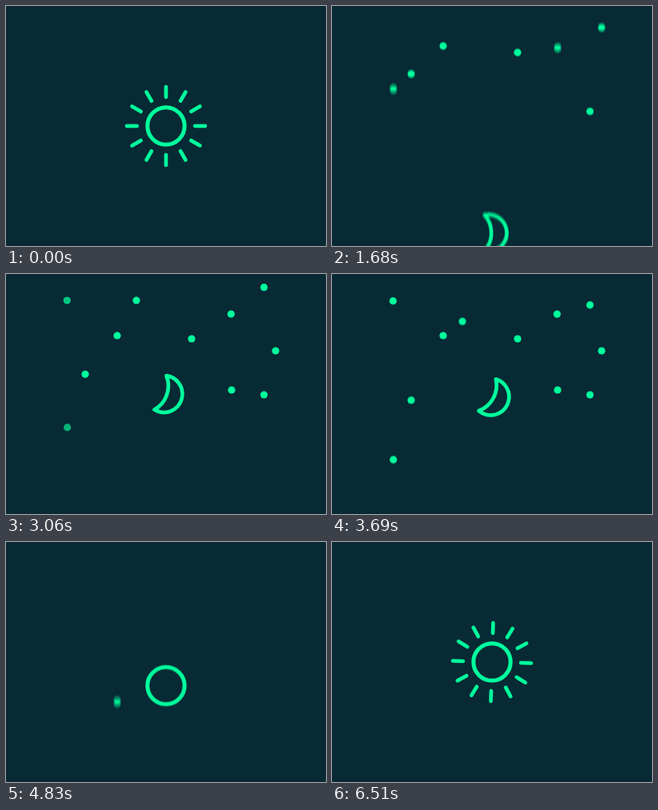
These frames come from a looping animation (400 by 300 pixels, 6.54 s). An HTML page with a canvas:

```html
<!DOCTYPE html>
<html lang="en">
<head>
<meta charset="utf-8">
<title>Day and night</title>
<style>
  html, body { margin: 0; width: 100%; height: 100%; overflow: hidden; background: #072a35; }
  canvas { display: block; width: 400px; height: 300px; }
</style>
</head>
<body>
<canvas id="stage" width="400" height="300"></canvas>
<script>
const LOOP = 6540, STEP = 30, SHUTTER = 16, SAMPLES = 6;
const SKY = '#072a35', GLOW = '#00ff9c';
const REST = 150, BELOW = 330;

const stage = document.getElementById('stage').getContext('2d');
const layer = document.createElement('canvas');
layer.width = 400;
layer.height = 300;
const pen = layer.getContext('2d');

// x, resting y, entry start, fall start, fall duration, twinkle depth
const stars = [
  [322.5, 151, 1325, 4080, 570, 0],
  [232, 81, 1422, 3950, 710, 0],
  [139, 77, 1454, 4200, 780, 0],
  [99, 125, 1447, 2900, 1407, 0],
  [337, 96, 1587, 3900, 712, 0],
  [76.7, 190, 1509, 2724, 1370, 0.35],
  [282, 145, 1570, 3980, 705, 0],
  [281.3, 50, 1690, 3599, 1151, 0],
  [322.5, 16.7, 1720, 3011, 1609, 0],
  [163, 33, 1760, 3100, 1294, 0],
  [76.3, 33, 1850, 3540, 1100, 0.25]
];

const rad = deg => deg * Math.PI / 180;
const progress = (t, start, length) => Math.min(1, Math.max(0, (t - start) / length));
const easeIn = p => p ** 3;
const easeOut = p => 1 - (1 - p) ** 3;
const mix = (a, b, p) => a + (b - a) * p;

function drawStar(t, [x, rest, enter, fall, length, depth]) {
  if (t < enter || t > fall + length) return;
  const y = t < fall
    ? mix(-10, rest, easeOut(progress(t, enter, 700)))
    : mix(rest, 310, easeIn(progress(t, fall, length)));
  const twinkle = Math.max(0, 1 - Math.abs(t - 3060) / 350);
  pen.globalAlpha = 1 - depth * twinkle;
  pen.beginPath();
  pen.arc(x, y, 4.6, 0, 2 * Math.PI);
  pen.fill();
  pen.globalAlpha = 1;
}

function rayCount(t) {
  const count = t < 3000 ? 12 - Math.floor((t - 470) / 55) : Math.floor((t - 5000) / 55) + 1;
  return Math.min(12, Math.max(0, count));
}

function drawSun(t) {
  const y = t < 3000
    ? mix(REST, BELOW, easeIn(progress(t, 880, 670)))
    : mix(BELOW, REST, easeOut(progress(t, 4216, 1357)));
  pen.save();
  pen.translate(200, y);
  pen.lineWidth = 5;
  pen.beginPath();
  pen.arc(0, 0, 23.2, 0, 2 * Math.PI);
  pen.stroke();
  pen.lineWidth = 4.7;
  pen.rotate(rad(-360 * t / LOOP));
  for (let i = 0, n = rayCount(t); i < n; i++) {
    pen.beginPath();
    pen.moveTo(36.2, 0);
    pen.lineTo(49, 0);
    pen.stroke();
    pen.rotate(rad(30));
  }
  pen.restore();
}

function drawMoon(t) {
  if (t < 1552 || t > 4180) return;
  const y = t < 3300
    ? mix(BELOW, REST, easeOut(progress(t, 1552, 1357)))
    : mix(REST, BELOW, easeIn(progress(t, 3510, 670)));
  const tilt = 19.5 * (t - 1680) / 1380;
  const r = 23, spread = rad(102), inner = 34;
  const tipX = r * Math.cos(spread), tipY = r * Math.sin(spread);
  const sweep = Math.asin(tipY / inner);
  pen.save();
  pen.translate(195.5 + tilt * 0.1, y);
  pen.rotate(rad(tilt));
  pen.lineWidth = 4.7;
  pen.beginPath();
  pen.arc(0, 0, r, -spread, spread);
  pen.arc(tipX - inner * Math.cos(sweep), 0, inner, sweep, -sweep, true);
  pen.closePath();
  pen.stroke();
  pen.restore();
}

function drawScene(t) {
  pen.fillStyle = SKY;
  pen.fillRect(0, 0, 400, 300);
  pen.fillStyle = pen.strokeStyle = GLOW;
  pen.lineCap = pen.lineJoin = 'round';
  stars.forEach(star => drawStar(t, star));
  drawSun(t);
  drawMoon(t);
}

// Average several moments within the shutter for motion blur.
function render(t) {
  for (let i = 0; i < SAMPLES; i++) {
    drawScene(t + SHUTTER * ((i + 0.5) / SAMPLES - 0.5));
    stage.globalAlpha = 1 / (i + 1);
    stage.drawImage(layer, 0, 0);
  }
}

const begin = performance.now();
function tick() {
  const t = (performance.now() - begin) % LOOP;
  render(Math.floor(t / STEP) * STEP);
  requestAnimationFrame(tick);
}
tick();
</script>
</body>
</html>
```
